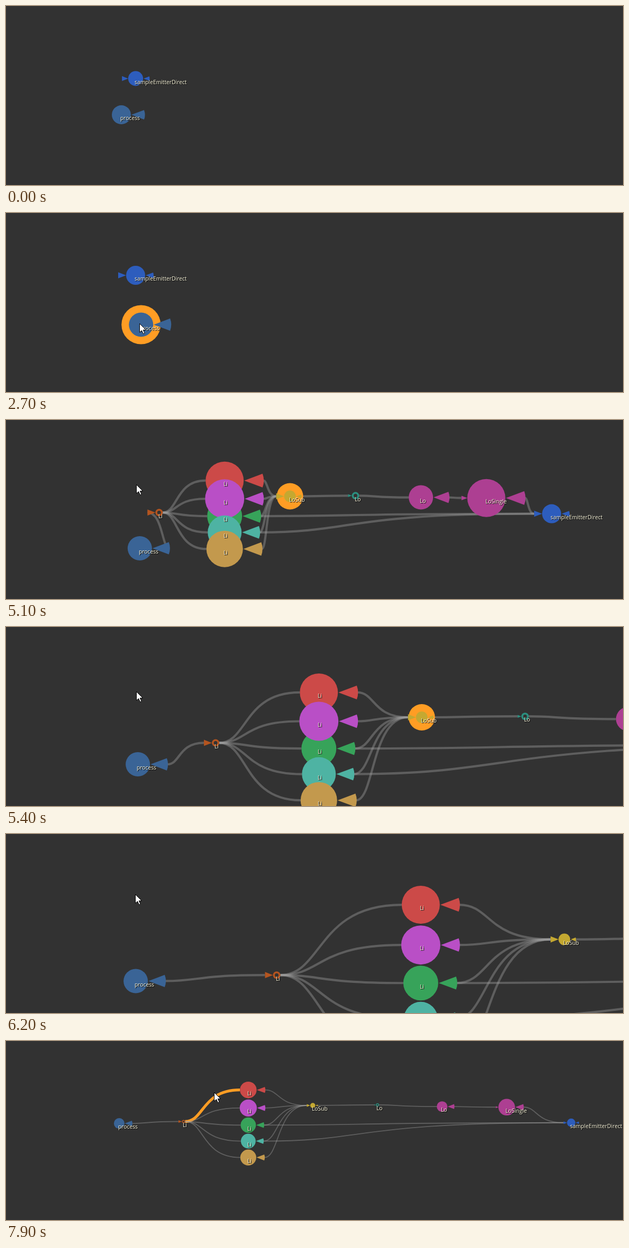
Animation, 1166 px wide and 339 px high, one loop 8 s. Source, as an HTML page with a canvas:

```html
<!DOCTYPE html>
<html lang="en">
<head>
<meta charset="utf-8">
<title>Node graph</title>
<style>
html, body { margin: 0; width: 100%; height: 100%; overflow: hidden; background: #323232; }
canvas { display: block; }
</style>
</head>
<body>
<canvas id="stage" width="1166" height="339"></canvas>
<script>
const ctx = document.getElementById('stage').getContext('2d');
const LOOP = 8000, STEP = 100;
const BG = '#323232', HOT = '#ff9d24', WIRE = 'rgba(160,160,160,.4)';
const CENTER = [104, 98.5];
const WEDGE = 0.36;

// at: place relative to CENTER, r: radius, inL / outL: wedge lengths
const node = (label, color, x, y, r, inL, outL, hollow) =>
  ({ label, color, at: [x, y], r, inL, outL, hollow });
const nodes = {
  process: node('process', '#3a6496', 136.6, 176.5, 23, 0, 33),
  first: node('Li', '#b4541f', 407, 168.5, 7, 15, 0, true),
  red: node('Li', '#cc4a48', 679, 35.5, 36, 0, 37),
  green: node('Li', '#37a35a', 679, 183.5, 33, 0, 35),
  purple: node('Li', '#b94fc6', 679, 111.5, 37, 0, 36),
  teal: node('Li', '#4eb3a3', 679, 251, 32, 0, 34),
  tan: node('Li', '#c3994d', 679, 320, 34.5, 0, 36),
  sub: node('LoSub', '#c4a831', 950, 101, 11, 15, 10),
  ring: node('Lo', '#2b9080', 1222, 98.5, 7, 7, 0, true),
  pink: node('Lo', '#ad3f92', 1493.5, 105.6, 23, 0, 30),
  single: node('LoSingle', '#ad3f92', 1765, 108, 36, 11, 37),
  emitter: node('sampleEmitterDirect', '#2d5dbd', 2036, 173.5, 18, 15, 15)
};

const layers = ['red', 'green', 'purple', 'teal', 'tan'];
const links = [
  ['process', 'first'],
  ...layers.map(n => ['first', n]),
  ...layers.map(n => [n, 'sub']),
  ['sub', 'ring'], ['ring', 'pink'], ['pink', 'single'], ['single', 'emitter'],
  ['green', 'emitter'], ['teal', 'emitter']
];

// Linear interpolation over keys [time, ...values]
function track(keys, t) {
  if (t <= keys[0][0]) return keys[0].slice(1);
  for (let i = 1; i < keys.length; i++) {
    const a = keys[i - 1], b = keys[i];
    if (t <= b[0]) {
      const u = (t - a[0]) / (b[0] - a[0]);
      return a.slice(1).map((v, j) => v + (b[j + 1] - v) * u);
    }
  }
  return keys[keys.length - 1].slice(1);
}

const dragPath = [
  [1000, 218, 206], [1100, 219, 209], [1200, 226, 216], [1300, 240, 220],
  [1400, 260, 214], [1500, 275, 202], [1600, 282, 194], [1700, 278, 197],
  [1800, 266, 204], [1900, 256, 209], [2000, 253, 210.5]
];
const pointerPath = [
  [200, 936, 90], [400, 620, 125], [600, 320, 188], [800, 210, 203],
  [1000, 210, 203]
];
const pointerLater = [
  [2600, 245, 207], [2700, 252, 209], [2900, 252, 209], [3500, 258, 134],
  [3600, 258, 134], [3700, 246, 122], [5800, 246, 122], [6200, 244, 114],
  [6700, 222, 87], [7100, 187, 87], [7300, 260, 110], [7600, 424, 115],
  [7700, 424, 115], [7900, 393, 97]
];
const endView = [
  [7200, 0.386, 132, 58], [7600, 0.494, 65.6, 23], [7700, 0.4366, 107.1, 33.7]
];

const about = (s, x, y) => [s, x * (1 - s), y * (1 - s)];

function viewAt(t) {
  if (t < 5000) {
    const s = t < 2400 ? 0.782 : t < 2500 ? 0.884 : 1;
    return about(s, 245, 207);
  }
  if (t <= 6200) return [1, 0, 0];
  if (t < 7100) {
    const n = Math.max(0, 7 - (t - 6300) / STEP);
    return about(0.386 * Math.pow(1.127, n), 215, 94.5);
  }
  return track(endView, t);
}

function pointerAt(t) {
  if (t <= 1000) return track(pointerPath, t);
  if (t <= 2500) {
    const [x, y] = track(dragPath, t);
    return [x - 8, y - 3];
  }
  return track(pointerLater, t);
}

function placesAt(t) {
  if (t < 5000) {
    const [x, y] = track(dragPath, t), [s, ox, oy] = about(0.782, 245, 207);
    return { emitter: [245, 118], process: [(x - ox) / s, (y - oy) / s] };
  }
  const rest = Math.pow(1 - Math.min(1, (t - 5000) / 2100), 3.75);
  const spread = 1.03 - 0.69 * rest;
  const places = {};
  for (const id in nodes) {
    places[id] = nodes[id].at.map((v, i) => CENTER[i] + v * spread);
  }
  places.process[0] += 104 * rest;
  places.process[1] += 77 * rest;
  return places;
}

function disc(x, y, r, color) {
  ctx.fillStyle = color;
  ctx.beginPath();
  ctx.arc(x, y, r, 0, Math.PI * 2);
  ctx.fill();
}

function drawLink(a, b, pa, pb, hot) {
  const x0 = pa[0] + a.r + a.outL, x1 = pb[0] - b.r - b.inL, dx = x1 - x0;
  ctx.strokeStyle = hot ? HOT : WIRE;
  ctx.lineWidth = hot ? 12 : 4.2;
  ctx.beginPath();
  ctx.moveTo(x0, pa[1]);
  ctx.bezierCurveTo(x0 + dx * 0.35, pa[1], x1 - dx * 0.7, pb[1], x1, pb[1]);
  ctx.stroke();
}

function drawNode(n, [x, y], hot) {
  if (hot) disc(x, y, n.r + 14, HOT);
  ctx.fillStyle = n.color;
  if (n.outL) {
    const tip = x + n.r + 1;
    ctx.beginPath();
    ctx.moveTo(tip, y);
    ctx.arc(tip, y, n.outL, -WEDGE, WEDGE);
    ctx.fill();
  }
  if (n.inL) {
    const tip = x - n.r, h = n.inL * 0.39;
    ctx.beginPath();
    ctx.moveTo(tip, y);
    ctx.lineTo(tip - n.inL, y - h);
    ctx.lineTo(tip - n.inL, y + h);
    ctx.fill();
  }
  disc(x, y, n.r, n.color);
  if (n.hollow) disc(x, y, n.r * 0.5, BG);
}

function drawLabel(text, x, y) {
  const left = Math.round(x - 1.8), base = Math.round(y + 10.3);
  ctx.fillStyle = '#000';
  ctx.fillText(text, left + 1, base + 1);
  ctx.fillStyle = '#fffbe0';
  ctx.fillText(text, left, base);
}

const arrow = new Path2D('M0 0V16.5L4 13L7 19.3L9.6 18.2L6.8 12H12Z');

function drawPointer([x, y], dragging) {
  ctx.save();
  ctx.translate(Math.round(x) + 0.5, Math.round(y) + 0.5);
  ctx.lineWidth = 1;
  ctx.fillStyle = '#fff';
  ctx.strokeStyle = '#000';
  ctx.fill(arrow);
  ctx.stroke(arrow);
  if (dragging) {
    ctx.strokeStyle = '#111';
    ctx.strokeRect(2, 15, 11, 7);
    ctx.strokeStyle = '#eee';
    ctx.setLineDash([1, 1]);
    ctx.strokeRect(2, 15, 11, 7);
  }
  ctx.restore();
}

function hotNode(t) {
  if (t >= 800 && t < 3200) return 'process';
  if (t >= 5000 && t < 5900) return 'sub';
  return '';
}

function draw(t) {
  const [s, ox, oy] = viewAt(t), places = placesAt(t), hot = hotNode(t);
  ctx.fillStyle = BG;
  ctx.fillRect(0, 0, 1166, 339);

  ctx.save();
  ctx.translate(ox, oy);
  ctx.scale(s, s);
  for (const [from, to] of links) {
    if (places[from] && places[to]) {
      const lit = t >= 7900 && from === 'first' && to === 'red';
      drawLink(nodes[from], nodes[to], places[from], places[to], lit);
    }
  }
  for (const id in nodes) {
    if (places[id]) drawNode(nodes[id], places[id], id === hot);
  }
  ctx.restore();

  ctx.font = '10.3px "Open Sans", "Noto Sans", sans-serif';
  for (const id in places) {
    const [x, y] = places[id];
    drawLabel(nodes[id].label, ox + x * s, oy + y * s);
  }
  if (t >= 200) drawPointer(pointerAt(t), t >= 3700 && t < 5000);
}

const start = performance.now();
function tick() {
  const t = (performance.now() - start) % LOOP;
  draw(Math.floor(t / STEP) * STEP);
  requestAnimationFrame(tick);
}
tick();
</script>
</body>
</html>
```
